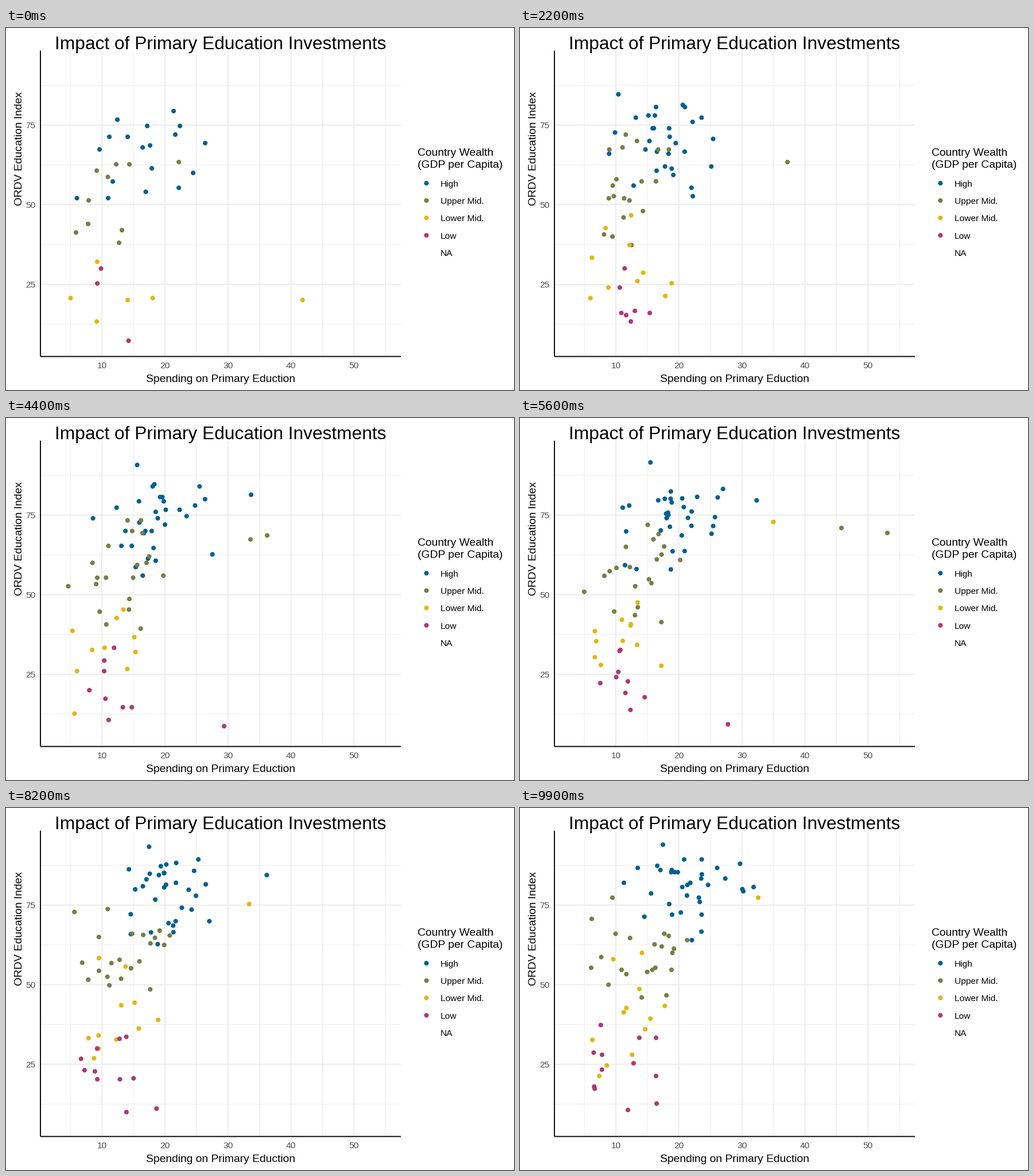
Recreate the animation shown at these times as a matplotlib script. Size 885 by 632 pixels, loop 10 s.

```python
import matplotlib.pyplot as plt
import numpy as np
from matplotlib.animation import FuncAnimation

W, H, DPI = 885, 632, 128
FRAMES, STEP, LAST = 100, 11, 9     # frames, frames per year, last year
COLORS = ["#006091", "#767f46", "#e2b70d", "#ab3a76"]
LABELS = ["High", "Upper Mid.", "Lower Mid.", "Low", "NA"]
LEFT, RIGHT, TOP, BOTTOM = 60, 688, 39.5, 573.5
BIG, MID, SMALL = 31.6, 19.3, 15.45
GREY, INK = "#ebebeb", "#4d4d4d"

plt.rcParams["font.family"] = "Liberation Sans"
rng = np.random.default_rng(11)


def pt(size):
    return size * 72 / DPI


def px(v):
    return 57.15 + 10.985 * v


def py(v):
    return 586.5 - 5.56 * v


# First year of each wealth class: x, y, x, y, ...
HIGH = [292, 145, 194, 160, 246, 171, 303, 171, 180, 190, 212, 190, 295, 186,
        347, 201, 163, 212, 238, 208.5, 251, 205, 254, 245, 326, 253,
        186, 268, 301, 279, 123.5, 297, 178, 297, 243.5, 286]
UPPER = [301, 234, 192, 238, 215, 238, 158, 249, 177.5, 260, 144, 301,
         143, 342, 122, 357, 202, 375 - 22, 197, 375]
LOWER = [159, 408, 112.5, 471.5, 212, 475, 255.5, 471.5, 158, 512.5,
         516.5, 475]
LOW = [165.5, 420, 159, 446, 213.5, 546]

# Countries far from the crowd: class, years, x, y
TRACKS = [
    (0, [4, 5, 6, 7.5, 9], [228.5, 226, 240, 249.5, 249], [82, 78, 73, 67.5, 64]),
    (0, [4, 6, 7.5, 9], [427, 400, 456, 407], [134, 152, 116, 138]),
    (1, [2, 4, 5, 6, 7], [466, 455, 642, 619, 545], [234, 205, 201, 197, 193]),
    (1, [4, 5, 6], [426, 559, 570], [212, 192, 192]),
    (2, [5, 7, 9], [442, 426, 415], [182, 171, 156.5]),
    (3, [3, 4, 5, 6, 9], [502, 380, 370, 285, 238], [542, 538, 535, 533, 516]),
]


def grow(first, count, mean_x, mean_y, spread):
    """Yearly positions and head counts of one class drifting as a crowd."""
    first = np.reshape(first, (-1, 2))
    start, end = np.array([mean_x, mean_y]).T
    z = rng.normal(size=(count[1], 2))
    z[:len(first)] = (first - start) / spread
    path, heads = [], []
    for year in range(LAST + 1):
        z = np.clip(z, -2, 2)
        xy = start + (end - start) * year / LAST + z * spread
        floor = np.array([106, 88])
        xy = floor + np.abs(xy - floor)
        xy[:, 1] = py(np.round(1.5 * (586.5 - xy[:, 1]) / 5.56) / 1.5)
        path.append(xy)
        heads.append(round(count[0] + (count[1] - count[0]) * year / LAST))
        z = 0.85 * z + 0.53 * rng.normal(size=z.shape)
    path[0][:len(first)] = first
    heads[0] = len(first)
    return np.array(path), heads


crowds = [
    grow(HIGH, (29, 32), (232, 285), (208, 136), (52, 50)),
    grow(UPPER, (18, 22), (180, 208), (292, 250), (42, 48)),
    grow(LOWER, (9, 12), (170, 200), (420, 370), (44, 60)),
    grow(LOW, (6, 11), (160, 165), (475, 455), (36, 38)),
]


def dots_at(frame):
    year = frame // STEP
    t = frame / STEP - year
    after = min(year + 1, LAST)
    out = []
    for path, heads in crowds:
        n = heads[year]
        out.append(path[year, :n] * (1 - t) + path[after, :n] * t)
    for c, years, xs, ys in TRACKS:
        now = frame / STEP
        if years[0] <= now <= years[-1]:
            spot = [np.interp(now, years, xs), np.interp(now, years, ys)]
            out[c] = np.vstack([out[c], spot])
    return out


fig = plt.figure(figsize=(W / DPI, H / DPI), dpi=DPI, facecolor="white")
ax = fig.add_axes([0, 0, 1, 1])
ax.set(xlim=(0, W), ylim=(H, 0))
ax.axis("off")


def line(xs, ys, color, width, z):
    ax.plot(xs, ys, color=color, lw=pt(width), solid_capstyle="butt",
            zorder=z, snap=False)


def text(x, y, s, size, ha="center", color="black", **kw):
    ax.text(x, y, s, fontsize=pt(size), ha=ha, va="baseline", color=color, **kw)


for v in range(5, 56, 5):
    major = v % 10 == 0
    line([px(v)] * 2, [TOP, BOTTOM], GREY, 1.87 if major else 0.94, major)
    if major:
        text(px(v), 593.7, str(v), SMALL, color=INK)
for k in range(1, 8):
    v, major = 12.5 * k, k % 2 == 0
    line([LEFT, RIGHT], [py(v)] * 2, GREY, 1.87 if major else 0.94, major)
    if major:
        text(51.7, py(v) + 5.6, f"{v:.0f}", SMALL, "right", INK)
line([LEFT, LEFT], [TOP, BOTTOM], "black", 1.87, 2)
line([LEFT, RIGHT], [BOTTOM, BOTTOM], "black", 1.87, 2)

text(373.8, 36.8, "Impact of Primary Education Investments", BIG)
text(373.8, 617.5, "Spending on Primary Eduction", MID)
text(24, 306.5, "ORDV Education Index", MID, rotation=90)
text(716.8, 222.8, "Country Wealth", MID, "left")
text(716.8, 243.8, "(GDP per Capita)", MID, "left")

key_y = 270.9 + 30.34 * np.arange(len(LABELS))
for y, label in zip(key_y, LABELS):
    text(756.6, y + 5.6, label, SMALL, "left")

style = dict(s=pt(8.1) ** 2, linewidths=0, zorder=3)
ax.scatter([732.4] * 4, key_y[:4], c=COLORS, **style)
dots = ax.scatter([], [], **style)


def draw(frame):
    classes = dots_at(frame)
    dots.set_offsets(np.vstack(classes))
    dots.set_facecolor([c for c, p in zip(COLORS, classes) for _ in p])
    return [dots]


anim = FuncAnimation(fig, draw, frames=FRAMES, interval=1000 // 10, repeat=True,
                     repeat_delay=0)
plt.show()
```
